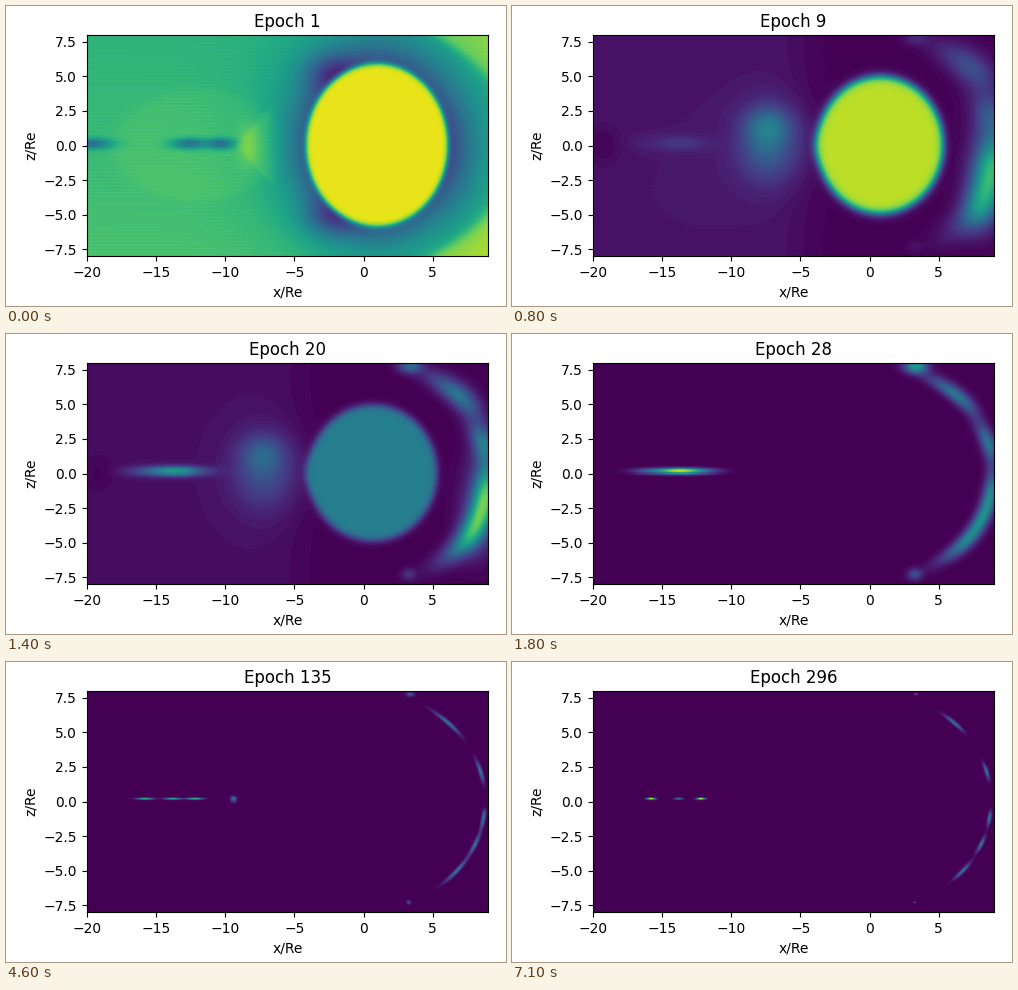
These frames come from a looping animation (500x300 px, 7.2 s). A matplotlib script:

```python
import numpy as np
import matplotlib.pyplot as plt
from matplotlib.animation import FuncAnimation

W, H, DPI = 500, 300, 100
FRAMES, INTERVAL = 72, 100
LEVELS = 60
NX, NZ = 401, 221
SPLIT, GONE = 11, 18  # fine structure starts to sharpen; planet has faded

ARC_PEAKS = [5.6, 2.1, -1.2, -3.1, -5]  # z along the bow
SHEET_PEAKS = [-15.8, -13.8, -12.2]  # x along the tail

x, z = np.meshgrid(-20 + (np.arange(NX) + 0.5) * 29 / NX,
                   8 - (np.arange(NZ) + 0.5) * 16 / NZ)
ripple = np.sin(8 * np.pi * z)


def bell(u, center, spread):
    return np.exp(-0.5 * ((u - center) / spread) ** 2)


def blob(cx, cz, sx, sz, strength):
    return strength * bell(x, cx, sx) * bell(z, cz, sz)


def sigmoid(u):
    return 1 / (1 + np.exp(-np.clip(u, -50, 50)))


def ramp(i, start, end, a=0, b=1):
    return np.interp(i, [start, end], [a, b])


def decay(i, start, a, b, tau):
    """Relax from a towards b after the start."""
    return b + (a - b) * np.exp(-max(i - start, 0) / tau)


def first_guess():
    d = np.maximum(np.hypot((x - 0.9) / 5.1, z / 5.9) - 1, 0)
    v = 0.68 - 0.45 * np.exp(-d / 0.38) - 0.004 * z + 0.006 * ripple
    v += 0.03 * sigmoid((1 - np.hypot((x + 12) / 6, z / 4)) / 0.05)
    v += 0.05 * sigmoid((x + 9.2 - 0.9 * abs(z)) / 0.1) * sigmoid((-6.5 - x) / 0.2)
    v += 0.2 * sigmoid((x - 11.3 + 0.1 * z ** 2) / 0.35)
    v += blob(7, -1, 1.5, 3.5, -0.1) + blob(-8.3, 0, 0.6, 1.2, 0.1)
    for side in (1, -1):
        v += blob(-2.4, 5.2 * side, 1.4, 1, -0.2)
    for cx, length in [(-19.8, 1.1), (-12.6, 0.9), (-10.3, 0.7)]:
        v += blob(cx, 0.1, length, 0.25, -0.32)
    return v


def faint_tail():
    v = blob(-9.5, 0, 3.5, 2.6, 0.075) + blob(-12, -4, 4.5, 2.5, 0.04)
    v += blob(-10.8, 0.3, 1, 0.7, -0.08) + blob(-8.1, 0.2, 0.6, 1.2, 0.1)
    return v * sigmoid((-6.6 - x) / 0.15) + 0.015 + 0.002 * ripple


def plume():
    v = 0.08 * sigmoid((-5 - x) / 0.8) + blob(-19.2, 0, 0.9, 1, -0.07)
    v += blob(-7.2, 0.1, 1.6, 1.9, 0.42) + blob(-7.3, 1.4, 1.1, 0.9, 0.28)
    return v + blob(8.9, -1.2, 1.1, 1.8, 0.5) + blob(8, -4.2, 0.9, 1.5, 0.3)


FIRST, FAINT, PLUME = first_guess(), faint_tail(), plume()


def arc(i):
    width = decay(i, SPLIT, 0.9, 0.09, 7)
    spread = decay(i, SPLIT, 1.2, 0.25, 30)
    bend = ramp(i, SPLIT, GONE, 0.65, 1)
    nose = ramp(i, SPLIT, 31, 8.9, 8.7)
    slope = bend * (0.136 * z + 0.002 * z ** 3)
    bow = nose - bend * (0.068 * z ** 2 + 0.0005 * z ** 4)
    across = bell((x - bow) / np.hypot(1, slope), 0, width)
    along = sum(bell(z, peak, spread) for peak in ARC_PEAKS)
    gap = ramp(i, GONE, 31) * np.exp(-((z - 0.2) / 0.8) ** 4)
    return 0.38 * along * across * (1 - gap)


def sheet(i):
    thick = decay(i, SPLIT, 0.4, 0.05, 5)
    spread = decay(i, SPLIT, 1.3, 0.1, 25)
    middle = ramp(i, GONE, 71, 0.8, 0.4)
    side = ramp(i, GONE, 71, 0.3, 0.95)
    v = sum(blob(peak, 0.13, spread, thick, strength)
            for peak, strength in zip(SHEET_PEAKS, (side, middle, side)))
    return v * ramp(i, SPLIT, GONE, 0.15, 1)


def spots(i):
    size = decay(i, GONE, 0.6, 0.06, 20)
    v = blob(3.3, 7.7, size, 0.6 * size, decay(i, GONE, 0.5, 0.2, 20))
    v += blob(3.2, -7.3, 0.6 * size, 0.5 * size, 0.22)
    v *= ramp(i, SPLIT, GONE, 0.3, 1)
    return v + blob(-9.4, 0.13, 0.14, 0.12, 0.4 * bell(i, 46, 6))


def add_planet(i, v):
    keys = [0, 3, SPLIT]
    cx = np.interp(i, keys, [0.9, 0.9, 0.6])
    rx = np.interp(i, keys, [5.15, 4.45, 4.6])
    rz = np.interp(i, keys, [5.88, 5.05, 4.85])
    soft = np.interp(i, keys, [0.021, 0.036, 0.033])
    level = np.interp(i, keys + [17], [0.97, 0.95, 0.865, 0])
    tip = ramp(i, 3, SPLIT, 0, 0.05)
    r = np.hypot((x - cx) / rx, z / rz) - tip * bell(z, 0, 1) * (x < cx)
    mask = sigmoid((1 - r) / soft)
    return v * (1 - mask) + level * mask


def field(i):
    v = FIRST * ramp(i, 0, 3, 1, 0)
    v = v + FAINT * np.interp(i, [0, 3, 9], [0, 1, 0])
    v = v + PLUME * np.interp(i, [3, SPLIT, 17], [0, 1, 0])
    v = v + ramp(i, 3, SPLIT) * (arc(i) + sheet(i) + spots(i))
    if i < 17:
        v = add_planet(i, v)
    return np.round(np.clip(v, 0, 1) * LEVELS) / LEVELS


def epoch(i):
    return int((1.365 + 0.2232 * i) ** 2)


fig = plt.figure(figsize=(W / DPI, H / DPI), dpi=DPI, facecolor="white")
ax = fig.add_axes([80.9 / W, 49.8 / H, 401.2 / W, 221.3 / H])
image = ax.imshow(field(0), extent=(-20, 9, -8, 8), aspect="auto", cmap="viridis",
                  vmin=0, vmax=1, interpolation="nearest")
ax.set_xticks(np.arange(-20, 6, 5))
ax.set_yticks(np.arange(-7.5, 8, 2.5))
ax.set_xlabel("x/Re")
ax.set_ylabel("z/Re")
title = ax.set_title("Epoch 1")


def update(i):
    image.set_data(field(i))
    title.set_text(f"Epoch {epoch(i)}")
    return image, title


anim = FuncAnimation(fig, update, frames=FRAMES, interval=INTERVAL, repeat=True,
                     repeat_delay=0)
plt.show()
```
